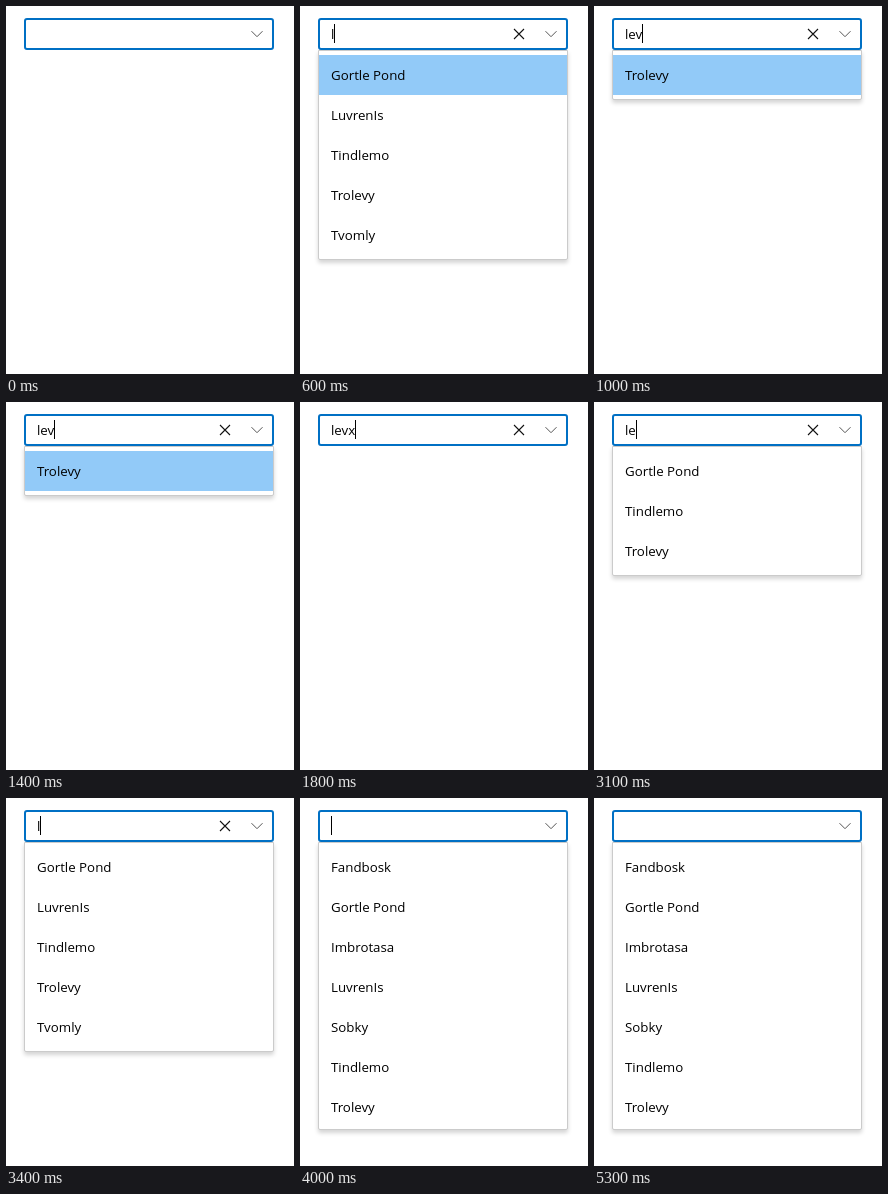
Animation of 288x368 px, one loop 5.4 s. Source, as an HTML page:

```html
<!DOCTYPE html>
<html lang="en">
<head>
<meta charset="utf-8">
<title>Filtering combo box</title>
<style>
  html, body { margin: 0; width: 100%; height: 100%; overflow: hidden; background: #fff; }
  body { position: relative; font: 13.3px "Open Sans", "Noto Sans", sans-serif; color: #000; }
  div, svg { position: absolute; box-sizing: border-box; }
  #field {
    left: 18px; top: 12px; width: 250px; height: 32px; padding-left: 11px;
    display: flex; align-items: center; line-height: 28px;
    border: 2px solid #0070c4; border-radius: 3px; background: #fff;
  }
  #caret { width: 1px; height: 19px; margin-top: -1px; background: #000; }
  #popup {
    left: 18px; top: 44px; width: 250px; padding-top: 4px; overflow: hidden;
    border: 1px solid #cbcbcb; border-radius: 0 0 2px 2px; background: #fff;
    box-shadow: 0 3px 4px rgba(0, 0, 0, .17);
  }
  #popup p { margin: 0; height: 40px; padding-left: 12px; line-height: 40px; white-space: nowrap; }
  #popup.active p:first-child { background: #92caf8; }
  svg { left: 0; top: 0; fill: none; }
</style>
</head>
<body>
<div id="popup"></div>
<div id="field"><span id="typed"></span><span id="caret"></span></div>
<svg width="288" height="368">
  <path d="M245.5 25.2 L251 30.7 L256.5 25.2" stroke="#555"/>
  <path id="clear" d="M214 23 L224 33 M224 23 L214 33" stroke="#111" stroke-width="1.1"/>
</svg>
<script>
const LOOP = 5400, ROW = 40, MAX_HEIGHT = 288;
const names = ["Fandbosk", "Gortle Pond", "Imbrotasa", "LuvrenIs",
               "Sobky", "Tindlemo", "Trolevy", "Tvomly"];

// start time, typed text, list open, first row highlighted, caret shown
const steps = [
  [0,    "",     false, false, false],
  [400,  "l",    true,  true,  true],
  [700,  "le",   true,  true,  true],
  [1000, "lev",  true,  true,  true],
  [1800, "levx", true,  false, true],
  [2700, "lev",  true,  false, true],
  [3000, "le",   true,  false, true],
  [3400, "l",    true,  false, true],
  [3600, "",     true,  false, true],
  [5300, "",     true,  false, false]
];

const el = id => document.getElementById(id);
const show = (id, on) => { el(id).style.visibility = on ? "visible" : "hidden"; };
const popup = el("popup");
let current;

function render([, text, open, active, caret]) {
  const found = names.filter(name => name.toLowerCase().includes(text));
  el("typed").textContent = text;
  show("caret", caret);
  show("clear", text);
  show("popup", open && found.length);
  popup.className = active ? "active" : "";
  popup.style.height = Math.min(found.length * ROW + 10, MAX_HEIGHT) + "px";
  // Rows past the height limit stay out of view
  popup.replaceChildren(...found.slice(0, 7).map(name => {
    const row = document.createElement("p");
    row.textContent = name;
    return row;
  }));
}

function tick() {
  const time = performance.now() % LOOP;
  const step = steps.findLast(([start]) => start <= time);
  if (step !== current) render(current = step);
  requestAnimationFrame(tick);
}
tick();
</script>
</body>
</html>
```
